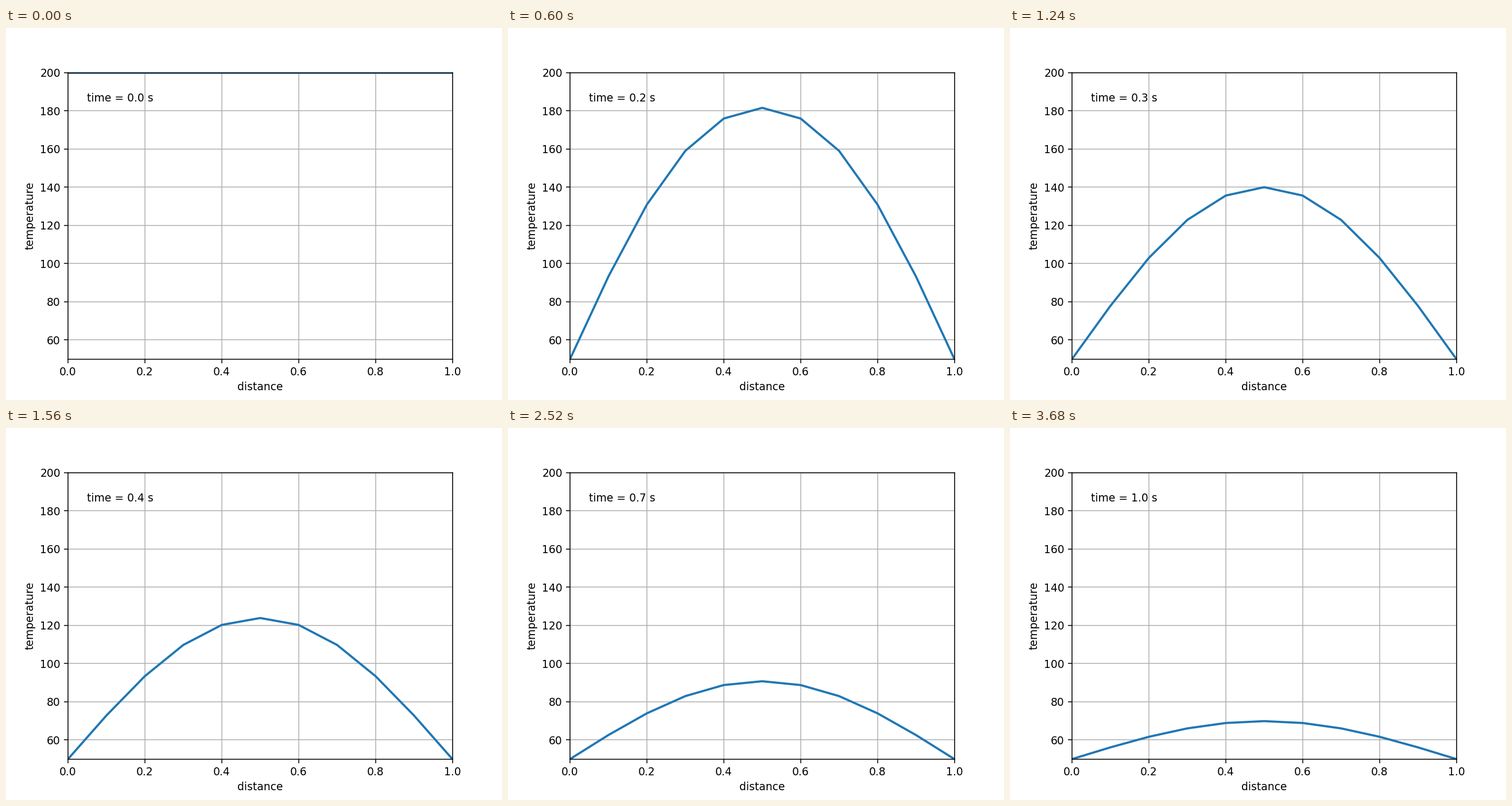
A matplotlib script for the animation above (3.72 s loop, 864x648 px).

```python
import numpy as np
import matplotlib.pyplot as plt
from matplotlib.animation import FuncAnimation

FRAMES = 93
INTERVAL = 40  # ms
HOT, COLD = 200.0, 50.0
DIFFUSIVITY = 0.23
CELLS = 10

dx = 1 / CELLS
dt = 0.25 * dx**2 / DIFFUSIVITY


def step(temp):
    """Advance the rod by one explicit heat-equation step with cold ends."""
    new = np.full_like(temp, COLD)
    curvature = temp[2:] - 2 * temp[1:-1] + temp[:-2]
    new[1:-1] = temp[1:-1] + DIFFUSIVITY * dt / dx**2 * curvature
    return new


def solve():
    states = [np.full(CELLS + 1, HOT)]
    for _ in range(FRAMES - 1):
        states.append(step(states[-1]))
    return states


x = np.linspace(0, 1, CELLS + 1)
states = solve()

plt.rcParams["font.family"] = "DejaVu Sans"
fig, ax = plt.subplots(figsize=(6.4, 4.8), dpi=135)
ax.set(xlim=(0, 1), ylim=(COLD, HOT), xlabel="distance", ylabel="temperature")
ax.grid()
line, = ax.plot(x, states[0], lw=2)
label = ax.text(0.05, 0.9, "", transform=ax.transAxes)


def draw(i):
    line.set_ydata(states[i])
    label.set_text(f"time = {i * dt:.1f} s")
    return line, label


anim = FuncAnimation(fig, draw, frames=FRAMES, interval=INTERVAL,
                     repeat=True, repeat_delay=0)
plt.show()
```
